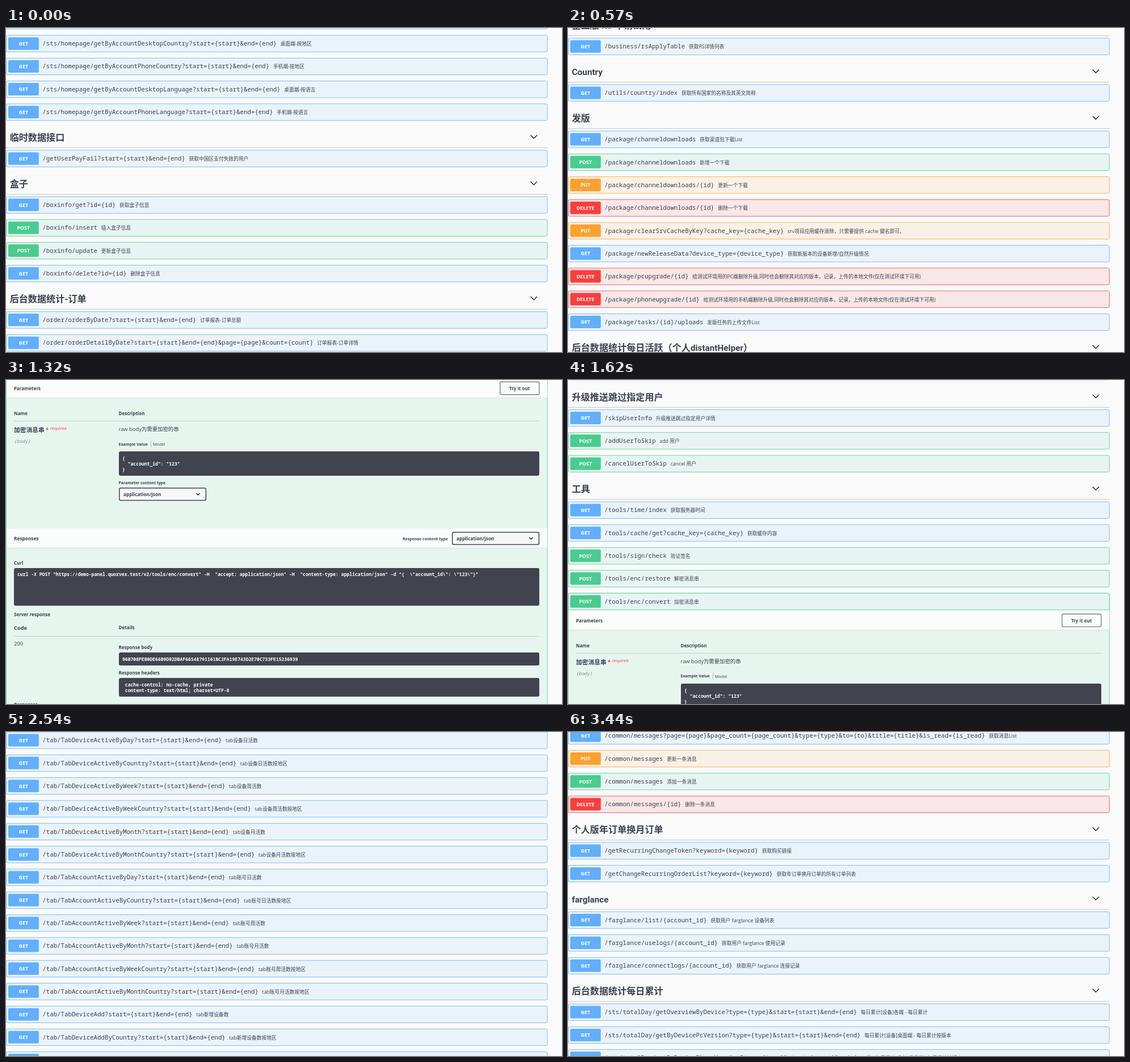
Write an HTML page that moves like this. It is 980 px wide and 572 px high and loops after 4.4 s.

```html
<!DOCTYPE html>
<html lang="zh-CN">
<head>
<meta charset="utf-8">
<title>API list</title>
<style>
html, body { margin: 0; width: 100%; height: 100%; overflow: hidden; background: #fafafa; }
svg { display: block; }
text { fill: #3b4151; white-space: pre; font-family: "Open Sans", "Noto Sans CJK SC", "Noto Sans CJK", sans-serif; }
.bold { font-weight: 700; }
.button { font-weight: 700; fill: #fff; text-anchor: middle; }
.path { font: 500 10.75px "Noto Sans Mono", monospace; }
.title { font-weight: 700; font-family: Roboto, "Noto Sans CJK SC", "Noto Sans CJK", sans-serif; }
.latin { font-size: .95em; }
.mono { font: 700 8.07px "Noto Sans Mono", monospace; fill: #fff; }
.type { font: italic 400 8.07px "Noto Sans Mono", monospace; fill: #888; }
.red { fill: #f33; }
.chevron { fill: none; stroke: #111; stroke-width: 1.3; }
</style>
</head>
<body>
<svg width="980" height="572"><g id="list"></g></svg>
<script>
// "@step top" pins the next item to a screen position at that step; "#" is a heading, "!" the opened call.
const listing = `
@23 -8.4
GET /common/messages?page,page_count,type,to,title,is_read 获取消息List
PUT /common/messages 更新一条消息
POST /common/messages 添加一条消息
DELETE /common/messages/{id} 删除一条消息
# 个人版年订单换月订单
GET /getRecurringChangeToken?keyword 获取购买链接
GET /getChangeRecurringOrderList?keyword 获取年订单换月订单的所有订单列表
# farglance
GET /farglance/list/{account_id} 获取用户 farglance 设备列表
GET /farglance/uselogs/{account_id} 获取用户 farglance 使用记录
GET /farglance/connectlogs/{account_id} 获取用户 farglance 连接记录
# 后台数据统计每日累计
GET /sts/totalDay/getOverviewByDevice?type,start,end 每日累计[设备]各端 - 每日累计
GET /sts/totalDay/getByDevicePcVersion?type,start,end 每日累计[设备]桌面端 - 每日累计按版本
GET /sts/totalDay/getByDevicePhoneVersion?type,start,end 每日累计[设备]手机端 - 每日累计按版本
GET /sts/totalDay/getByDeviceCountry?type,start,end 每日累计[设备]每日累计按地区
@20 4.1
GET /sts/totalDay/getOverviewByAccount?type,start,end 每日累计[账号]每日累计用户
GET /sts/totalDay/getByAccountRegType?type,start,end 每日累计[账号]用户每日累计按注册来源
GET /sts/totalDay/getByAccountPcVersion?type,start,end 每日累计[账号]桌面端 - 每日累计按版本
GET /sts/totalDay/getByAccountPhoneVersion?type,start,end 每日累计[账号]手机端 - 每日累计按版本
GET /sts/totalDay/getByAccountCountry?type,start,end 每日累计[账号]每日用户累计按地区
# 企业版测试账号
POST /business/addTestAccount 对测试账号进行标示
POST /business/deleteTestAccount 对测试账号进行移除
POST /business/addTestAccountBatch 对测试账号进行标示-批量
# 企业工具
POST /business/upgradeToBizMasterTrial 将普通帐号升级为企业测试主帐号
POST /business/addFakeDevices/{id} 添加企业设备
POST /business/changeBizDay 企业账号有效时间修改
POST /business/changeDeviceLimit 企业部署设备上限修改
POST /business/changeBizOwner 企业账号主帐号修改
# 后台数据统计-tab
@17 -0.5
GET /tab/TabDeviceActiveByDay?start,end tab设备日活数
GET /tab/TabDeviceActiveByCountry?start,end tab设备日活数按地区
GET /tab/TabDeviceActiveByWeek?start,end tab设备周活数
GET /tab/TabDeviceActiveByWeekCountry?start,end tab设备周活数按地区
GET /tab/TabDeviceActiveByMonth?start,end tab设备月活数
GET /tab/TabDeviceActiveByMonthCountry?start,end tab设备月活数按地区
GET /tab/TabAccountActiveByDay?start,end tab账号日活数
GET /tab/TabAccountActiveByCountry?start,end tab账号日活数按地区
GET /tab/TabAccountActiveByWeek?start,end tab账号周活数
GET /tab/TabAccountActiveByMonth?start,end tab账号月活数
GET /tab/TabAccountActiveByWeekCountry?start,end tab账号周活数按地区
GET /tab/TabAccountActiveByMonthCountry?start,end tab账号月活数按地区
GET /tab/TabDeviceAdd?start,end tab新增设备数
GET /tab/TabDeviceAddByCountry?start,end tab新增设备数按地区
GET /tab/TabAccountAdd?start,end tab新增账号数
GET /tab/TabAccountAddByCountry?start,end tab新增账号数按地区
# 企业版用户设备
GET /business/userinfo/get?keyword 获取企业版用户信息
GET /business/device/list?account_id 获取企业设备列表
GET /business/moduleUse/get?mail,type 获取使用设备数量
@13 14.3
GET /business/resetModuleUse?mail,type 重置使用设备数量
GET /business/deviceall/get?keyword 获取企业版用户控制端设备信息
GET /business/deviceall/pcLocalLog/get?account_id 给改企业用户发送 push 消息，获取其当前在线的 pc 控制端的本地 log
GET /business/daemon/get?keyword 获取 daemon 信息
GET /business/daemon/localLog/get?device_id 给这台企业设备发送 push 消息，获取其本地 log
GET /business/daemon/loglevel/modify?device_id,log_level 给这台企业设备发送 push 消息，修改其 log level
# 后台支付来源对应接口
GET /config/getFromTypeList 后台支付来源对应接口
# 企业版联系我们接口
GET /business/contactUs 企业版联系我们接口
# 升级推送跳过指定用户
GET /skipUserInfo 升级推送跳过指定用户详情
POST /addUserToSkip add 用户
POST /cancelUserToSkip cancel 用户
# 工具
GET /tools/time/index 获取服务器时间
GET /tools/cache/get?cache_key 获取缓存内容
POST /tools/sign/check 验证签名
POST /tools/enc/restore 解密消息串
@9 -34
!
# 企业版订单
GET /business/order/list?start,end 获取企业版订单列表
GET /business/order/get?id 获取企业版订单详情
POST /business/order/insert 新增企业版订单
POST /business/order/update 更新企业版订单
GET /business/order/delete?id 删除企业版订单
GET /business/order/export?start,end 导出企业版订单
GET /business/order/count?start,end 企业版订单总数
# 企业版 RS 申请试用
@4 17.5
GET /business/rsApplyTable 获取RS详情列表
# Country
GET /utils/country/index 获取所有国家的名称及其英文简称
# 发版
GET /package/channeldownloads 获取渠道包下载List
POST /package/channeldownloads 新增一个下载
PUT /package/channeldownloads/{id} 更新一个下载
DELETE /package/channeldownloads/{id} 删除一个下载
PUT /package/clearSrvCacheByKey?cache_key srv项目应用缓存清除，只需要提供 cache 键名即可。
GET /package/newReleaseData?device_type 获取新版本的设备新增/自然升级情况
DELETE /package/pcupgrade/{id} 给测试环境用的PC端删除升级,同时也会删除其对应的版本，记录，上传的本地文件(仅在测试环境下可用)
DELETE /package/phoneupgrade/{id} 给测试环境用的手机端删除升级,同时也会删除其对应的版本，记录，上传的本地文件(仅在测试环境下可用)
GET /package/tasks/{id}/uploads 发版任务的上传文件List
# 后台数据统计每日活跃（个人distantHelper）
GET /sts/active/getOverview?start,end 每日活跃总览
GET /sts/active/getByVersion?start,end 每日活跃按版本
GET /sts/active/getByCountry?start,end 每日活跃按地区
GET /sts/active/getByLanguage?start,end 每日活跃按语言
# 后台数据统计首页
GET /sts/homepage/getOverview?start,end 首页总览
GET /sts/homepage/getByAccountRegType?start,end 按注册来源
@0 12.4
GET /sts/homepage/getByAccountDesktopCountry?start,end 桌面端-按地区
GET /sts/homepage/getByAccountPhoneCountry?start,end 手机端-按地区
GET /sts/homepage/getByAccountDesktopLanguage?start,end 桌面端-按语言
GET /sts/homepage/getByAccountPhoneLanguage?start,end 手机端-按语言
# 临时数据接口
GET /getUserPayFail?start,end 获取中国区支付失败的用户
# 盒子
GET /boxinfo/get?id 获取盒子信息
POST /boxinfo/insert 插入盒子信息
POST /boxinfo/update 更新盒子信息
GET /boxinfo/delete?id 删除盒子信息
# 后台数据统计-订单
GET /order/orderByDate?start,end 订单报表-订单总额
GET /order/orderDetailByDate?start,end,page,count 订单报表-订单详情`;

const ROW = 40.33, HEAD = 41.66, OPEN = 694;
const LOOP = 4400, LAST_STEP = 23;
const COLORS = {
  GET: ['#61affe', '#eaf3f9'], POST: ['#49cc90', '#e8f4f2'],
  PUT: ['#fca130', '#faf1e6'], DELETE: ['#f93e3e', '#fae7e7'],
};

// For text, y is the vertical middle.
const text = (x, y, str, size = 8, cls = 'bold') =>
  `<text x="${x}" y="${y + size * .36}" font-size="${size}" class="${cls}">${str}</text>`;
const rect = (x, y, w, h, style) => `<rect x="${x}" y="${y}" width="${w}" height="${h}" ${style}/>`;
const chevron = (x, y, r) => `<path class="chevron" d="M${x - r} ${y - r / 2}l${r} ${r}l${r} ${-r}"/>`;
const frame = (height, fill, line) =>
  rect(.4, .4, 953.8, height - .8, `rx="2.7" fill="${fill}" stroke="${line}" stroke-width=".8"`);

function row(method, path, note) {
  const [line, fill] = COLORS[method];
  const full = path.replace(/\?(.*)/, (_, keys) => '?' + keys.split(',').map(k => `${k}={${k}}`).join('&amp;'));
  return frame(30.25, fill, line) + rect(4, 4, 53.8, 22, `rx="2" fill="${line}"`)
    + text(30.8, 15.2, method, 8.8, 'button')
    + text(64.3, 15.6, `<tspan class="path">${full}</tspan><tspan dx="6.7">${note}</tspan>`, 8.74, '');
}

function heading(title) {
  return text(6.7, 19.6, title.replace(/\w+/g, '<tspan class="latin">$&</tspan>'), 16.1, 'title')
    + chevron(930.3, 18.4, 5.6) + rect(0, 37.5, 954.5, .8, 'fill="#3b4151" opacity=".35"');
}

function openCall() {
  const code = (x, y, str) => text(x, y, str, 8.07, 'mono');
  const dark = (x, y, h) => rect(x, y, 940 - x, h, 'rx="3" fill="#41444e"');
  const rule = y => rect(14, y, 926, 1, 'fill="#3b4151" opacity=".2"');
  const bar = y => rect(1, y, 953, 34, 'fill="#fff" opacity=".8"') + rect(1, y + 34, 953, 1, 'fill="#000" opacity=".07"');
  const select = (x, y) => rect(x + .8, y + .8, 152.6, 21.6, 'rx="2.5" fill="#f7f7f7" stroke="#41444e" stroke-width="1.5"')
    + text(x + 8, y + 12, 'application/json', 8.2) + chevron(x + 139.5, y + 11.5, 3);

  return frame(684, '#e7f5ef', COLORS.POST[0]) + row('POST', '/tools/enc/convert', '加密消息串')
    + '<g transform="translate(0 34)">'
    + bar(-3) + text(14, 15, 'Parameters', 8.1)
    + rect(870.8, 3.3, 69, 22.4, 'rx="2.5" fill="none" stroke="#808080" stroke-width="1.4"') + text(887, 15, 'Try it out')
    + text(14, 59, 'Name') + text(198.5, 59, 'Description') + rule(72)
    + text(14, 88, '加密消息串', 10.75) + text(70, 88, '*', 9, 'bold red') + text(78, 85.5, 'required', 7.2, 'red')
    + text(14, 108, '(body)', 8.07, 'type') + text(198.5, 87, 'raw body为需要加密的串', 9.4, '')
    + text(198.5, 113, 'Example Value', 7.05) + rect(255, 107, 1, 12, 'fill="#3b4151" opacity=".3"') + text(259, 113, 'Model', 7.3, '')
    + dark(199, 126, 43) + code(205, 138, '{') + code(205, 148, '  "account_id": "123"') + code(205, 158, '}')
    + text(198.5, 182, 'Parameter content type', 6.9) + select(199, 190)
    + bar(262) + text(14, 280, 'Responses', 8.3) + text(699, 280, 'Response content type', 7) + select(786, 268)
    + text(14, 323, 'Curl') + dark(14, 332, 66.5)
    + code(20, 343, 'curl -X POST "https://demo-panel.quorvex.test/v2/tools/enc/convert" -H  "accept: application/json" -H  "content-type: application/json" -d "{  \\"account_id\\": \\"123\\"}"')
    + text(14, 414, 'Server response') + text(14, 437.5, 'Code', 9.3) + text(198.5, 437.5, 'Details', 8.1) + rule(452)
    + text(14, 466, '200', 9.4, '') + text(198.5, 472, 'Response body') + dark(199, 481, 23)
    + code(205, 493, '960708FEB0DE66B9D92DBAF66548791161BC2FA19E743D2E70C733FE15236939')
    + text(198.5, 517, 'Response headers') + dark(199, 526, 33)
    + code(205, 538, ' cache-control: no-cache, private') + code(205, 548, ' content-type: text/html; charset=UTF-8')
    + text(14, 573, 'Responses') + text(14, 596, 'Code', 9.3) + text(198.5, 596, 'Description') + rule(610)
    + text(14, 626, '200', 9.4, '') + text(198.5, 626, '加密后的消息串', 9.4, '')
    + '</g>';
}

const list = document.getElementById('list');
const anchors = [];
let y = 0, markup = '';

function add(item, height) {
  markup += `<g transform="translate(0 ${y})">${item}</g>`;
  y += height;
}

for (const line of listing.trim().split('\n')) {
  const [kind, first, ...rest] = line.split(' ');
  if (kind[0] === '@') anchors.unshift({ step: +kind.slice(1), scroll: y - first });
  else if (kind === '#') add(heading(line.slice(2)), HEAD);
  else if (kind === '!') add(openCall(), OPEN);
  else add(row(kind, first, rest.join(' ')), ROW);
}
list.innerHTML = markup;

const changeAt = i => 120 + 150 * i + 10 * (i > 11) + 10 * (i > 14);

function stepAt(time) {
  let step = 0;
  while (step < LAST_STEP && time >= changeAt(step)) step++;
  return step;
}

function scrollAt(step) {
  const next = Math.max(1, anchors.findIndex(a => a.step >= step));
  const a = anchors[next - 1], b = anchors[next];
  return a.scroll + (b.scroll - a.scroll) * (step - a.step) / (b.step - a.step);
}

let shown = -1;
function draw() {
  const step = stepAt(performance.now() % LOOP);
  if (step !== shown) {
    list.setAttribute('transform', `translate(0 ${-scrollAt(step)})`);
    shown = step;
  }
  requestAnimationFrame(draw);
}
draw();
</script>
</body>
</html>
```
